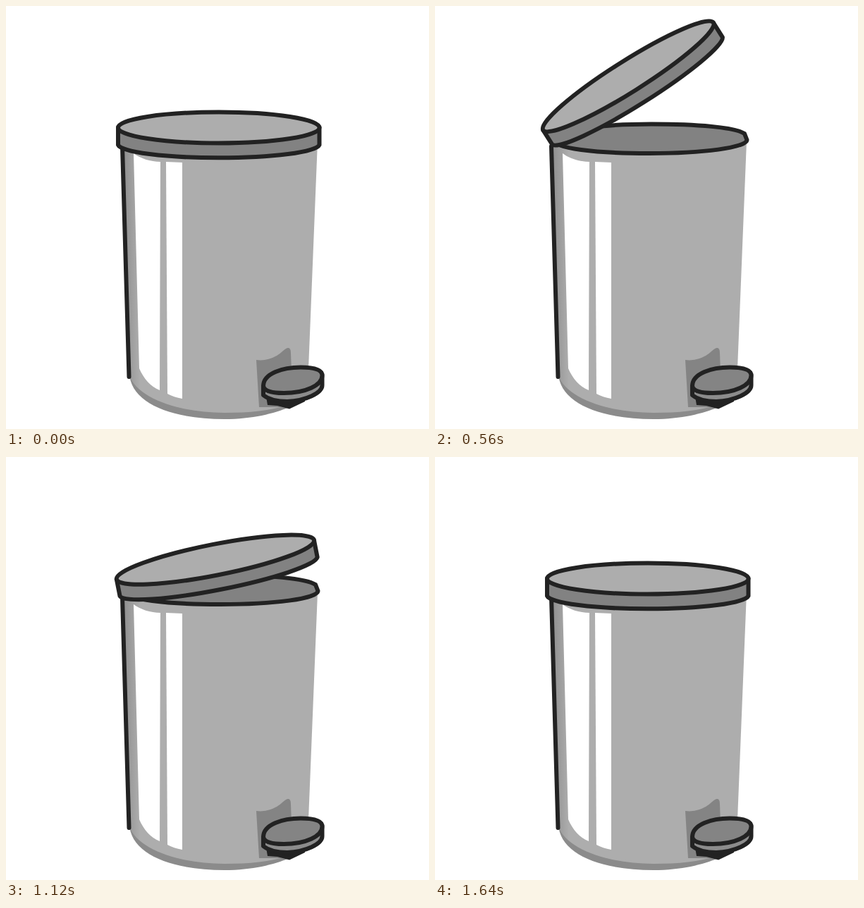
An HTML page that plays this animation: 600 by 600 pixels, repeating every 2160 ms.

```html
<!DOCTYPE html>
<html>
<head>
<meta charset="utf-8">
<title>Pedal bin</title>
<style>
  html, body { margin: 0; height: 100%; overflow: hidden; background: #fff; }
  svg { display: block; width: 100vw; height: 100vh; }
  .line { stroke: #222; stroke-width: 6; stroke-linejoin: round; stroke-linecap: round; }
</style>
</head>
<body>
<svg viewBox="0 0 600 600">
  <defs>
    <linearGradient id="shade" gradientUnits="userSpaceOnUse" x1="164" y1="0" x2="190" y2="0">
      <stop offset="0" stop-color="#8c8c8c"/>
      <stop offset="1" stop-color="#adadad"/>
    </linearGradient>
  </defs>

  <g id="body">
    <path fill="#8b8b8b" d="M175 520C176 564 236 586 310 586C350 586 380 578 402 569L390 540Z"/>
    <path fill="url(#shade)" d="M164 196L442 192L429 515L400 566C375 574 345 577 310 577C245 577 186 556 175 524Z"/>
    <path fill="#fff" d="M181 209C190 216 205 221 219 221L218 545C205 540 195 528 189 514Z"/>
    <path fill="#fff" d="M227 221L250 222L250 557Q238 555 229 550Z"/>
    <path class="line" d="M165 199L174.500 526"/>
    <path class="line" fill="#828282" d="M168 190C168 177 230 167.500 307 167.500C372 167.500 425 172 439 181L442.500 190C442 201 380 209 304 209C228 209 168 202 168 190Z"/>
  </g>

  <path fill="#848484" d="M355 502Q370 504 384 496C392 491 397 484 401 485Q404 486 404 492L405 520L395 569L359 569Z"/>
  <path fill="#222" d="M368 548H424V561L402 571.500L385 567L371 566Z"/>
  <g id="pedal" class="line">
    <path fill="#8c8c8c" d="M365 539V552C374 559 386 561 399 561C425 560 448.500 549 448.500 538V523Z"/>
    <path fill="#848484" d="M365 539C365 521 393 512.500 418 512.500C440 512.500 448.500 517 448.500 524C448.500 538 425 549 394 549C376 549 366 546 365 539Z"/>
  </g>

  <g id="lid" class="line">
    <path fill="#828282" d="M159 172.500V197A143 19.500 0 0 0 444.500 197V172.500Z"/>
    <ellipse fill="#adadad" cx="301.800" cy="172.500" rx="142.800" ry="22"/>
  </g>
</svg>
<script>
  const LOOP = 2160, STEP = 40;
  const OPEN_END = 240, CLOSE_END = 1640, MAX_ANGLE = 36.8;
  const KICK_TIME = 320, KICK_HEIGHT = 8;
  const lid = document.getElementById('lid');
  const pedal = document.getElementById('pedal');
  const ease = p => (1 - Math.cos(Math.PI * p)) / 2;

  function lidAngle(t) {
    if (t < OPEN_END) return MAX_ANGLE * ease(t / OPEN_END);
    const p = Math.min(1, (t - OPEN_END) / (CLOSE_END - OPEN_END));
    return MAX_ANGLE * (1 - ease(p));
  }

  function pedalLift(t) {
    return t < KICK_TIME ? KICK_HEIGHT * ease(2 * t / KICK_TIME) : 0;
  }

  function draw(now) {
    const t = Math.floor(now % LOOP / STEP) * STEP;
    lid.setAttribute('transform', `rotate(${-lidAngle(t)} 162.300 184)`);
    pedal.setAttribute('transform', `translate(0 ${-pedalLift(t)})`);
  }

  const start = performance.now();
  function tick() {
    draw(performance.now() - start);
    requestAnimationFrame(tick);
  }
  tick();
</script>
</body>
</html>
```
